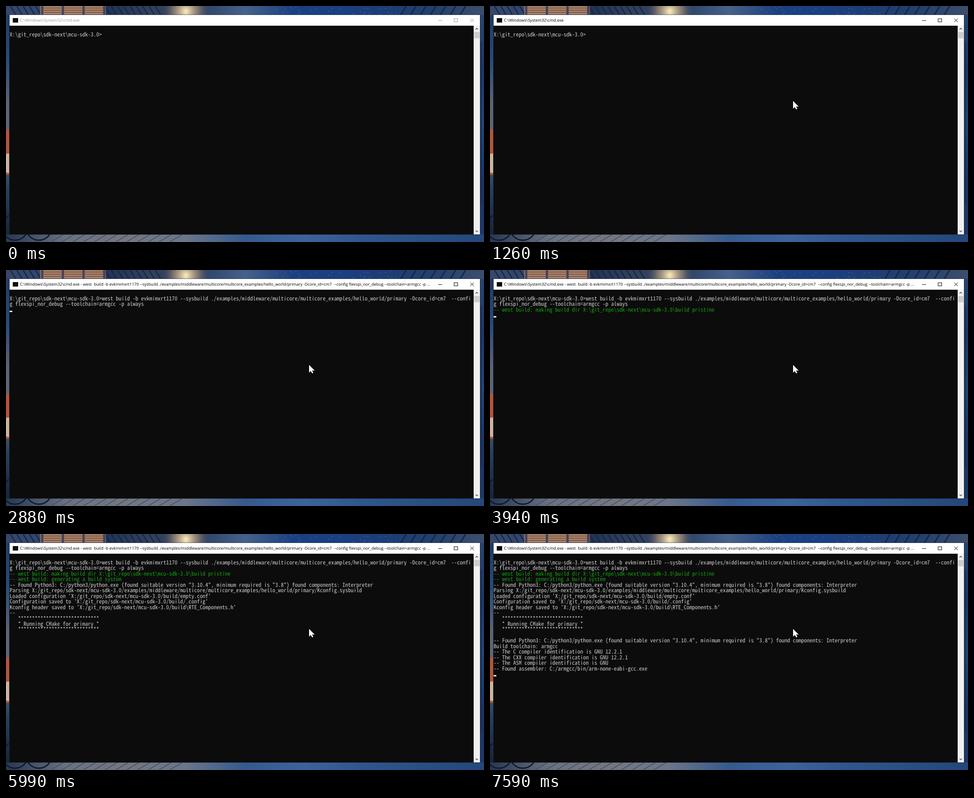
Animation of 1063x527 px, one loop 8 s. Source, as an HTML page with a canvas:

```html
<!DOCTYPE html>
<html lang="en">
<head>
<meta charset="utf-8">
<title>Terminal build</title>
<style>
html, body { margin: 0; width: 100%; height: 100%; overflow: hidden; background: #1d3763; }
canvas { display: block; }
</style>
</head>
<body>
<canvas id="stage" width="1063" height="527"></canvas>
<script>
const W = 1063, H = 527, LOOP = 8000;
const LEFT = 8, BASE = 67.8, CELL = 6.227, PITCH = 12.47, COLUMNS = 165;
const FOCUS = 730, ENTER = 2880, BLINK = 525.5;
const ctx = document.getElementById('stage').getContext('2d');

const MONO = '"Noto Sans Mono CJK SC", "Liberation Mono", monospace';
ctx.font = `100px ${MONO}`;
const monoFont = `${100 * CELL / ctx.measureText('0').width}px ${MONO}`;
const titleFont = '9.05px "Open Sans", "Noto Sans", sans-serif';

const TITLE = 'C:\\Windows\\System32\\cmd.exe';
const PROMPT = 'X:\\git_repo\\sdk-next\\mcu-sdk-3.0>';
const ARGS = 'build -b evkmimxrt1170 --sysbuild ./examples/middleware/multicore/multicore_examples/hello_world/primary -Dcore_id=cm7  --config flexspi_nor_debug --toolchain=armgcc -p ';
const COMMAND = `west ${ARGS}always`;
const PYTHON = '-- Found Python3: C:/python3/python.exe (found suitable version "3.10.4", minimum required is "3.8") found components: Interpreter';
const STARS = '   ' + '*'.repeat(29);

// Each screen holds the full console text; output also holds off the caret's next blink.
const screens = [];
function type(at, input) {
  screens.push({ at, text: PROMPT + input, hold: 0 });
}
function print(at, ...lines) {
  const text = screens.at(-1).text + lines.join('\n') + '\n';
  screens.push({ at, text, hold: BLINK - 1 });
}

type(0, '');
type(FOCUS, '');
type(1610, 'clear');
type(2390, COMMAND);
type(ENTER, COMMAND + '\n');
print(3940, '-- west build: making build dir X:\\git_repo\\sdk-next\\mcu-sdk-3.0\\build pristine');
print(4140, '-- west build: generating a build system');
print(5000, PYTHON);
print(5260,
  'Parsing X:/git_repo/sdk-next/mcu-sdk-3.0/examples/middleware/multicore/multicore_examples/hello_world/primary/Kconfig.sysbuild',
  "Loaded configuration 'X:/git_repo/sdk-next/mcu-sdk-3.0/build/empty.conf'",
  "Configuration saved to 'X:/git_repo/sdk-next/mcu-sdk-3.0/build/.config'",
  "Kconfig header saved to 'X:/git_repo/sdk-next/mcu-sdk-3.0/build\\RTE_Components.h'");
print(5460, '--', STARS, '   * Running CMake for primary *', STARS, '');
print(6320, PYTHON);
print(6390, 'Build toolchain: armgcc');
print(6920, '-- The C compiler identification is GNU 12.2.1');
print(7450, '-- The CXX compiler identification is GNU 12.2.1');
print(7520, '-- The ASM compiler identification is GNU');
print(7590, '-- Found assembler: C:/armgcc/bin/arm-none-eabi-gcc.exe');

function rect(c, color, x, y, w, h) {
  c.fillStyle = color;
  c.fillRect(x, y, w, h);
}

function line(c, color, width, ...points) {
  c.strokeStyle = color;
  c.lineWidth = width;
  c.beginPath();
  for (let i = 0; i < points.length; i += 2) c.lineTo(points[i], points[i + 1]);
  c.stroke();
}

function circle(c, color, x, y, r) {
  c.fillStyle = color;
  c.beginPath();
  c.arc(x, y, r, 0, Math.PI * 2);
  c.fill();
}

function ramp(c, x, y, w, h, ...colors) {
  const g = w > h ? c.createLinearGradient(x, 0, x + w, 0) : c.createLinearGradient(0, y, 0, y + h);
  colors.forEach((color, i) => g.addColorStop(i / (colors.length - 1), color));
  rect(c, g, x, y, w, h);
}

function paintWallpaper() {
  const layer = document.createElement('canvas');
  layer.width = W;
  layer.height = H;
  const c = layer.getContext('2d');
  let seed = 41;
  const random = () => (seed = seed * 16807 % 2147483647) / 2147483647;

  // Street, blinds, lamp and night sky above the window
  ramp(c, 0, 0, W, 20, '#37476a', '#304669', '#1f3254', '#33405a', '#2b3f63', '#46618a', '#1b4080', '#1b4080', '#1d3d74', '#24406b', '#3d4e6c');
  for (let x = 10; x < 340; x += 14) line(c, '#16284a', 2.5, x, 0, x + 12, 20);
  rect(c, '#7f6054', 76, 0, 146, 20);
  for (let y = 1; y < 20; y += 5) rect(c, '#b98c6c', 76, y, 146, 2);
  for (let x = 78; x < 222; x += 46) rect(c, '#48425b', x, 0, 5, 20);
  const glow = c.createRadialGradient(400, 12, 2, 400, 12, 55);
  glow.addColorStop(0, '#f6e6b4');
  glow.addColorStop(0.5, '#b0957699');
  glow.addColorStop(1, '#33405a00');
  rect(c, glow, 345, 0, 110, 20);
  for (let i = 0; i < 34; i++) rect(c, '#a9c0d6', 602 + random() * 270, random() * 19, 1, 1);
  for (let x = 890; x < 1030; x += 22) line(c, '#14284b', 3, x, 0, x - 12, 20);

  // Wall and poster on the left, posts on the right
  ramp(c, 0, 20, 8, 490, '#243b62', '#284a7b', '#5d6371', '#616775', '#27405a', '#172638');
  rect(c, '#b6533d', 0, 276, 8, 101);
  circle(c, '#d1b49c', 8, 351, 22);
  ramp(c, 1054, 20, 9, 490, '#28456f', '#1b3868', '#234778', '#1a3564', '#1c3867');
  rect(c, '#152b52', 1056, 80, 2, 360);

  // Paving and bicycle below
  ramp(c, 0, 510, W, 17, '#263852', '#6a7181', '#74777f', '#6b7689', '#365a8e', '#3c649a', '#2f568b', '#294f82', '#24477a');
  for (let x = 100; x < 375; x += 24) line(c, '#454f67', 1.5, x, 527, x + 28, 510);
  for (let x = 20; x < 80; x += 53) {
    c.beginPath();
    c.arc(x, 494, 29, 0, Math.PI * 2);
    c.strokeStyle = '#111a2c';
    c.lineWidth = 3;
    c.stroke();
  }
  return layer;
}
const wallpaper = paintWallpaper();

function drawWindow(t) {
  const ink = t < FOCUS ? '#999' : '#000';
  rect(ctx, '#17233a', 7, 19.5, 1048, 491);
  rect(ctx, '#fff', 8, 20, 1046, 24);
  rect(ctx, '#0c0c0c', 8, 44, 1032, 466);
  rect(ctx, '#f0f0f0', 1040, 44, 14, 466);
  rect(ctx, '#cdcdcd', 1041, 58, 12, 14);
  line(ctx, '#505050', 1.5, 1044.3, 52.5, 1047, 49.8, 1049.7, 52.5);
  line(ctx, '#505050', 1.5, 1044.3, 501.5, 1047, 504.2, 1049.7, 501.5);
  rect(ctx, '#0c0c0c', 15, 27, 12, 10);

  ctx.font = titleFont;
  ctx.fillStyle = ink;
  ctx.fillText(t < ENTER ? TITLE : `${TITLE} - west  ${ARGS}...`, 31, 35.2);
  rect(ctx, ink, 961, 32, 9, 1);
  line(ctx, ink, 1, 1032.5, 28, 1040.5, 36);
  line(ctx, ink, 1, 1040.5, 28, 1032.5, 36);
  ctx.strokeRect(996.5, 28.5, 8, 7);
}

function wrap(text) {
  return text.split('\n').flatMap(row =>
    row.length > COLUMNS ? [row.slice(0, COLUMNS), row.slice(COLUMNS)] : [row]);
}

function caretVisible(t, screen) {
  const ticks = time => Math.floor((time - FOCUS) / BLINK);
  const flips = Math.max(0, ticks(t) - ticks(screen.at + screen.hold));
  return t >= FOCUS && flips % 2 === 0;
}

function drawConsole(t) {
  const screen = screens.findLast(({ at }) => at <= t);
  const rows = wrap(screen.text);
  ctx.font = monoFont;
  rows.forEach((text, row) => {
    ctx.fillStyle = text.startsWith('-- west build') ? '#13a10e' : '#ccc';
    ctx.fillText(text, LEFT, BASE + row * PITCH);
  });
  if (caretVisible(t, screen)) {
    const x = LEFT + rows.at(-1).length * CELL;
    const y = 66 + (rows.length - 1) * PITCH;
    rect(ctx, '#f2f2f2', Math.round(x), Math.round(y), 6, 3);
  }
}

const arrow = new Path2D('M0 0v17l4-3.6 2.8 5.6 2.5-1.2-2.6-5.4h5.7z');

function drawPointer(t) {
  const rest = 1 - Math.min(1, Math.max(0, (t - 100) / 500));
  const away = rest ** 2;
  ctx.save();
  ctx.translate(674 + 300 * away, 212 + 330 * away);
  ctx.fillStyle = '#fff';
  ctx.fill(arrow);
  ctx.restore();
  if (t >= 660 && t < 800) circle(ctx, 'rgba(255, 255, 0, 0.5)', 673.3, 210.7, 14);
}

const start = performance.now();
function tick() {
  const t = (performance.now() - start) % LOOP;
  ctx.textRendering = 'geometricPrecision';
  ctx.drawImage(wallpaper, 0, 0);
  drawWindow(t);
  drawConsole(t);
  drawPointer(t);
  requestAnimationFrame(tick);
}
tick();
</script>
</body>
</html>
```
